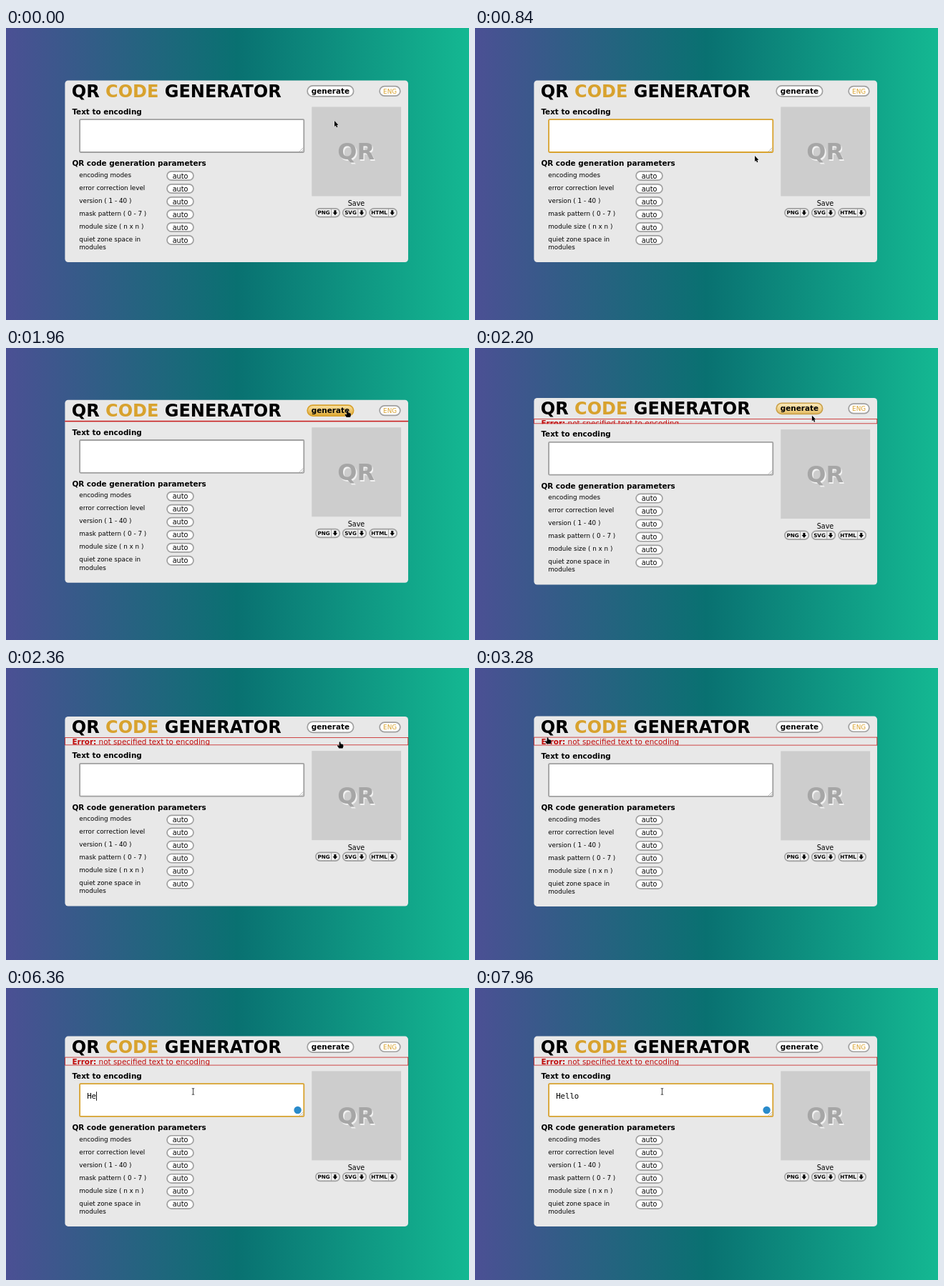
An HTML page with a canvas that plays this animation: 647 by 409 pixels, repeating every 8 s.

```html
<!DOCTYPE html>
<html lang="en">
<head>
<meta charset="utf-8">
<title>Code generator form</title>
<style>
  html, body { margin: 0; width: 100%; height: 100%; overflow: hidden; }
  canvas { display: block; }
</style>
</head>
<body>
<canvas id="stage" width="647" height="409"></canvas>
<script>
const ctx = document.getElementById('stage').getContext('2d');
const LOOP = 8000, STEP = 40;
const SANS = '"DejaVu Sans", sans-serif', MONO = '"DejaVu Sans Mono", monospace';
const GREY = [160, 160, 160], GOLD = [216, 162, 46], RED = '#c00a0a';

// Pointer path: time, x, y
const PATH = [
  [0, 459, 130], [240, 400, 152], [480, 330, 257], [700, 352, 168], [840, 391, 179],
  [960, 404, 206], [1300, 430, 150], [1640, 477, 88], [2000, 477, 88], [2360, 466.5, 103.5],
  [2520, 490, 114], [2640, 530, 117], [2760, 553, 103], [3280, 101.5, 97.3],
  [3360, 101.5, 97.3], [3720, 165, 132], [4120, 261.5, 145]
];
const TYPED = [[5520, 'H'], [6360, 'He'], [6880, 'Hel'], [7040, 'Hell'], [7400, 'Hello']];
const CARET = [[5320, 6520], [6880, 7640]];

const clamp = v => Math.max(0, Math.min(1, v));
const ramp = (t, from, to) => clamp((t - from) / (to - from));
const swing = v => 0.5 - 0.5 * Math.cos(Math.PI * v);
const blend = (a, b, k) => `rgb(${a.map((v, i) => Math.round(v + (b[i] - v) * k))})`;

function slope(i, axis) {
  if (i === 0 || i === PATH.length - 1) return 0;
  const [a, b, c] = [PATH[i - 1], PATH[i], PATH[i + 1]];
  const s1 = (b[axis] - a[axis]) / (b[0] - a[0]);
  const s2 = (c[axis] - b[axis]) / (c[0] - b[0]);
  return s1 * s2 <= 0 ? 0 : 2 * s1 * s2 / (s1 + s2);
}

function pointerAt(t) {
  const last = PATH.length - 1;
  if (t >= PATH[last][0]) return PATH[last].slice(1);
  const i = PATH.findIndex(p => p[0] > t) - 1;
  const a = PATH[i], b = PATH[i + 1], d = b[0] - a[0], u = (t - a[0]) / d;
  return [1, 2].map(k =>
    a[k] * (1 + 2 * u) * (1 - u) ** 2 + slope(i, k) * d * u * (1 - u) ** 2 +
    b[k] * u * u * (3 - 2 * u) + slope(i + 1, k) * d * u * u * (u - 1));
}

function text(str, x, y, size, { bold = false, color = '#000', align = 'left', family = SANS } = {}) {
  ctx.font = `${bold ? 'bold ' : ''}${size}px ${family}`;
  ctx.fillStyle = color;
  ctx.textAlign = align;
  ctx.fillText(str, x, y);
  return x + ctx.measureText(str).width;
}

// Rounded box given by its outer edges
function box(x, y, w, h, r, fill, stroke, line = 1.7) {
  ctx.beginPath();
  ctx.roundRect(x + line / 2, y + line / 2, w - line, h - line, r);
  ctx.fillStyle = fill;
  ctx.fill();
  ctx.strokeStyle = stroke;
  ctx.lineWidth = line;
  ctx.stroke();
}

function shape(points) {
  ctx.beginPath();
  points.forEach(([x, y]) => ctx.lineTo(x, y));
  ctx.closePath();
}

function background() {
  const g = ctx.createLinearGradient(0, 0, 647, 0);
  g.addColorStop(0, 'rgb(75,80,148)');
  g.addColorStop(0.5, 'rgb(9,113,113)');
  g.addColorStop(1, 'rgb(20,184,146)');
  ctx.fillStyle = g;
  ctx.fillRect(0, 0, 647, 409);
}

function header(glow) {
  let x = text('QR ', 91.8, 97, 24, { bold: true });
  x = text('CODE', x, 97, 24, { bold: true, color: blend(GOLD, GOLD, 0) });
  text(' GENERATOR', x, 97, 24, { bold: true });

  const fill = ctx.createLinearGradient(0, 81, 0, 96);
  fill.addColorStop(0, blend([255, 255, 255], [250, 226, 164], glow));
  fill.addColorStop(1, blend([255, 255, 255], [222, 168, 50], glow));
  box(420.3, 80, 66.2, 16.8, 8, fill, blend(GREY, GOLD, glow));
  text('generate', 453.4, 91.9, 10.4, { bold: true, align: 'center' });

  box(521.3, 80.8, 30.4, 15.2, 7, '#fff', blend(GREY, GREY, 0));
  text('ENG', 536.6, 91.8, 8.8, { color: blend(GOLD, GOLD, 0), align: 'center' });
}

function errorBar(h) {
  const top = 102.6 - h / 2;
  ctx.save();
  ctx.beginPath();
  ctx.rect(82, top, 480.5, h);
  ctx.clip();
  const x = text('Error:', 92.5, top + 9.8, 10.4, { bold: true, color: RED });
  text(' not specified text to encoding', x, top + 9.8, 10.4, { color: RED });
  ctx.restore();
  ctx.strokeStyle = '#c81e1e';
  ctx.lineWidth = 0.8;
  ctx.strokeRect(82.6, top + 0.4, 479.2, h - 0.8);
}

function textArea(t, glow) {
  text('Text to encoding', 92.4, 120.8, 10.4, { bold: true });
  box(102.2, 127.3, 315, 47.6, 1.2, '#fff', blend(GREY, GOLD, glow), 1.8);

  ctx.strokeStyle = '#999';
  ctx.lineWidth = 0.7;
  ctx.beginPath();
  for (const d of [5.5, 2.5]) {
    ctx.moveTo(415.4 - d, 173.2);
    ctx.lineTo(415.4, 173.2 - d);
  }
  ctx.stroke();

  const typed = TYPED.filter(e => e[0] <= t).pop();
  const end = text(typed ? typed[1] : '', 113.2, 149.3, 10.67, { family: MONO });
  if (CARET.some(([from, to]) => t >= from && t < to)) {
    ctx.fillStyle = '#000';
    ctx.fillRect(end, 139.3, 0.9, 12.6);
  }
  if (t >= 4280) {
    ctx.fillStyle = '#2a8bcb';
    ctx.beginPath();
    ctx.arc(407.6, 165.1, 5.2, 0, Math.PI * 2);
    ctx.fill();
  }
}

function parameters() {
  text('QR code generation parameters', 92.4, 193.4, 10.4, { bold: true });
  const labels = ['encoding modes', 'error correction level', 'version ( 1 - 40 )',
    'mask pattern ( 0 - 7 )', 'module size ( n x n )', 'quiet zone space in'];
  labels.forEach((label, i) => {
    const y = 207 + 18 * i;
    text(label, 102.3, y + 1.6, 8.8);
    box(224.2, y - 7, 38.6, 14, 6.2, '#fff', blend(GREY, GREY, 0));
    text('auto', 243.5, y + 3.5, 9.6, { align: 'center' });
  });
  text('modules', 102.3, 309.8, 8.8);
}

function saveButton(label, x, w, split) {
  const grey = blend(GREY, GREY, 0);
  box(x, 252, w, 13.4, 6, '#efefef', grey);
  ctx.fillStyle = grey;
  ctx.fillRect(split - 0.4, 253, 0.9, 11.4);
  text(label, (x + split) / 2 + 0.7, 261.4, 7.2, { bold: true, align: 'center' });
  const c = (split + x + w) / 2 - 1;
  shape([[c - 1.5, 255.3], [c + 1.5, 255.3], [c + 1.5, 258.4], [c + 3.3, 258.4],
    [c, 262.3], [c - 3.3, 258.4], [c - 1.5, 258.4]]);
  ctx.fillStyle = '#000';
  ctx.fill();
}

function preview() {
  ctx.fillStyle = '#cdcdcd';
  ctx.fillRect(427.3, 110.5, 124.8, 125);
  const mark = { bold: true, align: 'center' };
  text('QR', 490.8, 186, 32, { ...mark, color: '#f2f2f2' });
  text('QR', 489.2, 184.4, 32, { ...mark, color: '#a6a6a6' });
  text('Save', 489.5, 249, 9.6, { align: 'center' });
  saveButton('PNG', 432, 35.2, 454.6);
  saveButton('SVG', 469.8, 34.4, 491.8);
  saveButton('HTML', 507.3, 39.8, 534.4);
}

function pointer(x, y, h) {
  const inside = (l, t, r, b) => x >= l && x <= r && y >= t && y <= b;
  const up = h / 2;
  ctx.save();
  ctx.translate(x, y);
  ctx.lineJoin = 'round';
  ctx.fillStyle = '#000';
  ctx.strokeStyle = 'rgba(255,255,255,0.7)';
  ctx.lineWidth = 0.8;
  if (inside(102, 127 + up, 417, 175 + up)) {
    ctx.strokeStyle = '#333';
    ctx.lineWidth = 0.9;
    ctx.beginPath();
    for (const s of [-1, 1]) {
      ctx.moveTo(-1.8, 4.2 * s);
      ctx.lineTo(1.8, 4.2 * s);
    }
    ctx.moveTo(0, -4.2);
    ctx.lineTo(0, 4.2);
    ctx.stroke();
  } else if (inside(420, 80 - up, 487, 97 - up) || (h && inside(82, 102.6 - up, 562, 102.6 + up))) {
    shape([[-0.8, 0], [0.8, 0], [1.2, 2.8], [4.6, 3.6], [5, 6], [4, 9], [-1.2, 9],
      [-3.6, 5.4], [-2.8, 4.6], [-1, 5.6]]);
    ctx.stroke();
    ctx.fill();
  } else {
    shape([[0, 0], [0, 8], [1.8, 6.4], [3, 9.3], [4.4, 8.7], [3.2, 5.9], [5.4, 5.7]]);
    ctx.stroke();
    ctx.fill();
  }
  ctx.restore();
}

function draw(t) {
  const h = t < 1920 ? 0 : 1.4 + 10.4 * swing(ramp(t, 1920, 2440));
  const areaGlow = ramp(t, 120, 280) - ramp(t, 1360, 1520) + ramp(t, 3840, 4000);
  const buttonGlow = ramp(t, 1520, 1680) - ramp(t, 2160, 2320);

  background();
  ctx.fillStyle = '#e8e8e8';
  ctx.beginPath();
  ctx.roundRect(82.4, 73.5 - h / 2, 479.6, 254.5 + h, 4.5);
  ctx.fill();

  ctx.save();
  ctx.translate(0, -h / 2);
  header(buttonGlow);
  ctx.restore();
  if (h) errorBar(h);
  ctx.save();
  ctx.translate(0, h / 2);
  textArea(t, areaGlow);
  parameters();
  preview();
  ctx.restore();

  pointer(...pointerAt(t), h);
}

const start = performance.now();
function tick() {
  const t = (performance.now() - start) % LOOP;
  draw(Math.floor(t / STEP) * STEP);
  requestAnimationFrame(tick);
}
tick();
</script>
</body>
</html>
```
